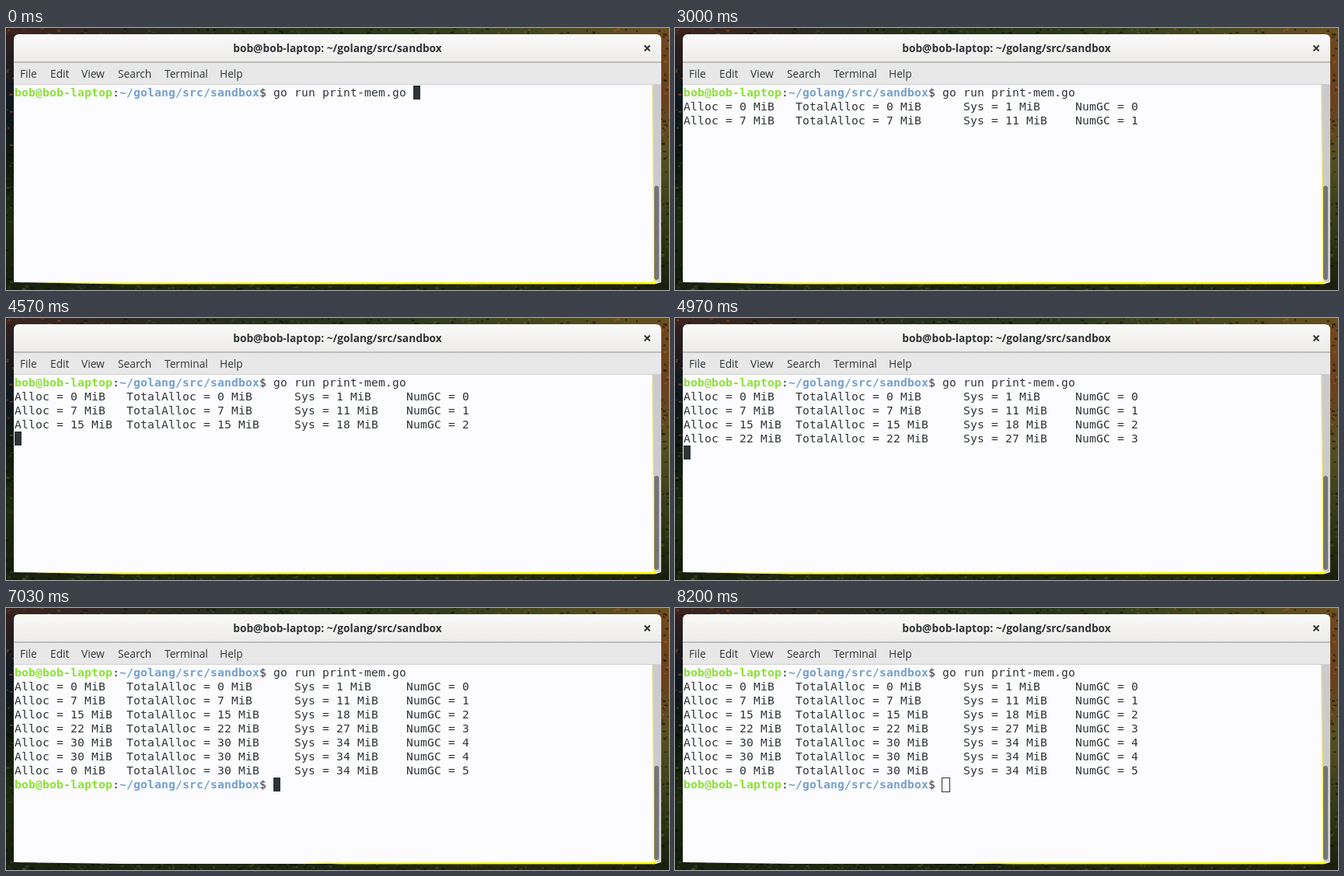
Animation, 853 px wide and 337 px high, one loop 8400 ms. Source, as an HTML page with a canvas:

```html
<!DOCTYPE html>
<html lang="en">
<head>
<meta charset="utf-8">
<title>Terminal</title>
<style>
  html, body { margin: 0; width: 100%; height: 100%; overflow: hidden; background: #1c2210; }
  #stage { position: relative; width: 853px; height: 337px; overflow: hidden; color: #2e3436; }
  #stage > * { position: absolute; }
  #wall, #chrome { left: 0; top: 0; }
  .title, .menu { font-family: "Open Sans", sans-serif; font-size: 13.75px; line-height: 20px; white-space: pre; }
  .title { left: 0; width: 853px; top: 16px; text-align: center; font-weight: 700; }
  .menu { top: 49px; }
  .row {
    left: 11px; height: 18px; line-height: 18px; white-space: pre;
    font-family: "DejaVu Sans Mono", monospace; font-size: 14.667px;
    letter-spacing: calc(9px - 1ch); font-variant-ligatures: none;
  }
  .row b:first-child { color: #8ae234; }
  .row b { color: #729fcf; }
  #cursor { box-sizing: border-box; width: 9px; height: 18px; border: 1px solid #2e3436; }
</style>
</head>
<body>
<div id="stage">
  <canvas id="wall" width="853" height="337"></canvas>
  <svg id="chrome" width="853" height="337">
    <defs>
      <linearGradient id="bar" x2="0" y2="1">
        <stop offset="0" stop-color="#fafaf8"/>
        <stop offset="1" stop-color="#ecebea"/>
      </linearGradient>
      <linearGradient id="glow" gradientUnits="userSpaceOnUse" x1="0" y1="73" x2="0" y2="327">
        <stop offset="0" stop-color="#e8e6b0"/>
        <stop offset="1" stop-color="#ffff10"/>
      </linearGradient>
    </defs>
    <path d="M10 44V15q0-7 7-7H836q7 0 7 7V44z" fill="url(#bar)"/>
    <path d="M10 44H843V73H10z" fill="#e8e8e8"/>
    <path d="M10 44H843" stroke="#94928f"/>
    <path d="M10 72.5H843" stroke="#d2d0d0"/>
    <path d="M10 73H843V327L836 329H150L10 327z" fill="#fcfcfe"/>
    <path d="M831 73H843V327H835z" fill="#cccacc"/>
    <path d="M831.5 73L834 326" stroke="url(#glow)" stroke-width="1.5" fill="none"/>
    <path id="edge" fill="#ffff10"/>
    <rect x="834" y="203" width="6" height="121" rx="3" fill="#747478"/>
    <path d="M821.5 22.5l7 7m0-7l-7 7" stroke="#2e3436" stroke-width="2"/>
  </svg>
  <div class="title">bob@bob-laptop: ~/golang/src/sandbox</div>
  <div id="cursor"></div>
</div>
<script>
const LOOP = 8400;
const stage = document.getElementById('stage');
const cursor = document.getElementById('cursor');
const edge = document.getElementById('edge');

function add(cls, html, style) {
  const el = document.createElement('div');
  el.className = cls;
  el.innerHTML = html;
  Object.assign(el.style, style);
  stage.insertBefore(el, cursor);
  return el;
}

// Soft forest wallpaper around the window, with leaf specks
function paintWall() {
  const g = document.getElementById('wall').getContext('2d');
  const fill = (x, y, w, h, stops, across) => {
    const grad = g.createLinearGradient(x, y, across ? x + w : x, across ? y : y + h);
    stops.forEach((c, i) => grad.addColorStop(i / (stops.length - 1), c));
    g.fillStyle = grad;
    g.fillRect(x, y, w, h);
  };
  fill(0, 0, 853, 20, ['#3c2420', '#2c2a20', '#26321a', '#2c381c', '#44481e', '#6a4e20'], true);
  fill(0, 327, 853, 10, ['#182010', '#20280f', '#1c240f', '#24280f', '#1c1e0e'], true);
  fill(0, 8, 12, 319, ['#30201e', '#101820', '#10180e', '#1e2a10', '#141c0c']);
  fill(841, 8, 12, 319, ['#70481e', '#6c401c', '#565020', '#363c16', '#1c220e']);
  let seed = 7;
  const rnd = () => (seed = seed * 16807 % 2147483647) / 2147483647;
  for (let i = 0; i < 5000; i++) {
    const x = rnd() * 853, y = rnd() * 337;
    const warm = y < 150 && (x < 100 || x > 600);
    g.fillStyle = rnd() < 0.55 ? 'rgba(4,8,4,.5)' : warm ? 'rgba(190,95,35,.5)' : 'rgba(90,110,50,.35)';
    g.fillRect(x, y, 1 + rnd() * 4, 1 + rnd() * 2);
  }
}
paintWall();

[['File', 18], ['Edit', 57], ['View', 97], ['Search', 144], ['Terminal', 204], ['Help', 275]]
  .forEach(([label, x]) => add('menu', label, { left: x + 'px' }));

const prompt = '<b>bob@bob-laptop</b>:<b>~/golang/src/sandbox</b>$ ';
const usage = (alloc, total, sys, gc) =>
  `Alloc = ${alloc} MiB`.padEnd(16) + `TotalAlloc = ${total} MiB`.padEnd(24) +
  `Sys = ${sys} MiB`.padEnd(16) + `NumGC = ${gc}`;

// [time shown, content]
const rows = [
  [0, prompt + 'go run print-mem.go'],
  [3000, usage(0, 0, 1, 0)],
  [3000, usage(7, 7, 11, 1)],
  [4000, usage(15, 15, 18, 2)],
  [4970, usage(22, 22, 27, 3)],
  [6000, usage(30, 30, 34, 4)],
  [7000, usage(30, 30, 34, 4)],
  [7000, usage(0, 30, 34, 5)],
  [7000, prompt]
].map(([at, html], i) => ({ at, el: add('row', html, { top: 74 + 18 * i + 'px' }) }));

const ENTER = 2100, DONE = 7000, BLUR = 7400;
const blinks = [400, 970, 1570, 2100, 2700, 3270, 3870, 4470, 5070, 5700, 6270, 6900];

function draw(t) {
  let shown = 0;
  for (const r of rows) {
    const on = t >= r.at;
    r.el.style.visibility = on ? 'visible' : 'hidden';
    shown += on;
  }
  const done = t >= DONE, hollow = t >= BLUR;
  const row = done ? 8 : t >= ENTER ? shown : 0;
  const col = done ? 37 : t >= ENTER ? 0 : 57;
  const lit = blinks.filter(b => t >= b).length % 2 === 0;
  Object.assign(cursor.style, {
    left: 11 + 9 * col - (hollow ? 1 : 0) + 'px',
    top: 74 + 18 * row + 'px',
    width: hollow ? '11px' : '9px',
    height: hollow ? '19px' : '18px',
    background: hollow ? 'none' : '#2e3436',
    visibility: lit ? 'visible' : 'hidden'
  });
  edge.setAttribute('d', `M${done ? 380 : 40} 327.5L833 326.5L838 325L835 329.5H${done ? 430 : 150}z`);
}

const start = performance.now();
function tick() {
  draw((performance.now() - start) % LOOP);
  requestAnimationFrame(tick);
}
tick();
</script>
</body>
</html>
```
